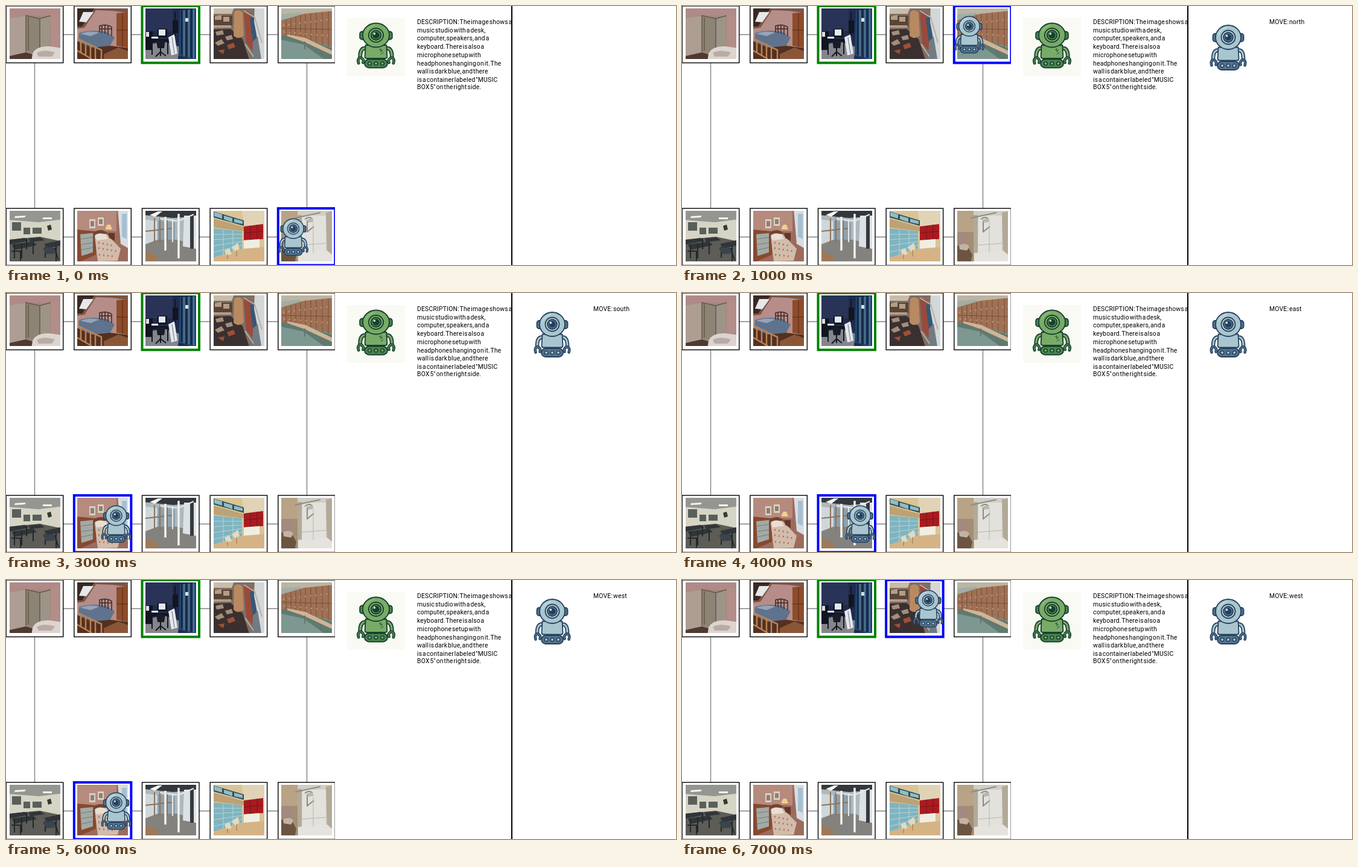
Write an HTML page that moves like this. It is 1110 by 430 pixels and loops after 8000 ms.

```html
<!DOCTYPE html>
<html lang="en">
<head>
<meta charset="utf-8">
<title>Robot room search</title>
<style>
  html, body { margin: 0; width: 100%; height: 100%; overflow: hidden; background: #fff; }
  svg { display: block; }
  text { font: 10.4px Roboto, Arial, sans-serif; letter-spacing: .2px; word-spacing: -2px; }
  .blue { --light: #a9c6d0; --mid: #55738f; --dark: #24405c; --pale: #c3d9e0; }
  .green { --light: #78ab68; --mid: #4b8550; --dark: #17402d; --pale: #8dbb78; }
  #rooms path[stroke] { fill: none; }
</style>
</head>
<body>
<svg width="1110" height="430" viewBox="0 0 1110 430">
  <defs>
    <clipPath id="photo"><path d="M0 0H84V84H0z"/></clipPath>
    <filter id="soft"><feGaussianBlur stdDeviation=".7"/></filter>
    <!-- origin: middle of the top edge of the head -->
    <g id="robot" stroke="var(--dark)" stroke-width="1.8" stroke-linejoin="round" stroke-linecap="round">
      <g id="arm" fill="none">
        <path d="M-18 43Q-25 44-25 57" stroke-width="6.5"/>
        <path d="M-18 43Q-25 44-25 57" stroke="var(--light)" stroke-width="3"/>
        <path d="M-27.500 68C-30 60-25 57-22 60Q-18.500 63-20.500 67" stroke-width="4.6"/>
        <path d="M-27.500 68C-30 60-25 57-22 60Q-18.500 63-20.500 67" stroke="var(--mid)" stroke-width="1.8"/>
      </g>
      <use href="#arm" transform="scale(-1 1)"/>
      <rect x="-25.500" y="15.500" width="51" height="13" rx="3.500" fill="var(--mid)"/>
      <path d="M-16.500 38H16.500L17.500 57Q17.500 60 14 60H-14Q-17.500 60-17.500 57z" fill="var(--light)"/>
      <ellipse cy="21.500" rx="21" ry="20" fill="var(--light)"/>
      <path d="M-16 17Q-12 7-3 5.500" fill="none" stroke="var(--pale)"/>
      <circle cy="21.500" r="11.500" fill="var(--pale)"/>
      <circle cy="21.500" r="8" fill="var(--mid)"/>
      <circle cy="21.500" r="4.500" fill="var(--dark)"/>
      <circle cx="-2.500" cy="19" r="1.700" fill="#e8f2f3" stroke="none"/>
      <rect x="-18" y="61.500" width="36" height="14" rx="7" fill="var(--mid)"/>
      <g fill="var(--light)" stroke-width="1.6">
        <circle cx="-10" cy="68.500" r="2.800"/><circle cy="68.500" r="2.800"/><circle cx="10" cy="68.500" r="2.800"/>
      </g>
    </g>
    <g id="rooms">
      <g id="shower">
        <path fill="#a08680" d="M-4-4H88V88H-4z"/>
        <path fill="#b08a86" d="M-4-4H88V14L27 11L-4 17z"/>
        <path fill="#ae9d92" d="M-4 17L27 12V73L-4 80z"/>
        <path fill="#8d8476" d="M27 12L50 17V77L27 71z"/>
        <path fill="#9d9488" d="M50 17L67 12V68L50 77z"/>
        <path stroke="#665944" stroke-width="1.5" d="M27 72V12L50 17L68 12M50 17V77M31 15V70"/>
        <path fill="#b38d87" d="M68 10H88V64H68z"/>
        <path fill="#4f3a30" d="M-4 80L27 73L44 78L39 88H-4z"/>
        <path fill="#ddd4cf" d="M38 75Q44 62 66 63L88 66V88H36z"/>
        <path fill="#b9aca6" d="M45 74Q56 67 75 73L70 80H48z"/>
      </g>
      <g id="attic">
        <path fill="#b68d88" d="M-4-4H88V88H-4z"/>
        <path fill="#7b5546" d="M-4-4H88V8L58 4L31 3L12 32L-4 34z"/>
        <path fill="#3a2821" d="M-4-4H31L8 30H-4z"/>
        <path fill="#e6e8ea" d="M10 6H27L15 23L3 22z"/>
        <path fill="#8d4c2b" d="M65 8L88 6V66L65 62z"/>
        <path stroke="#592b18" d="M75 8V64M65 36H84"/>
        <path fill="#5f738e" d="M3 41Q22 34 48 39L62 48L54 63L22 65L2 53z"/>
        <path fill="#95a4b7" d="M5 42Q20 36 37 40L22 46z"/>
        <path stroke="#3b2927" stroke-width="1.5" d="M37 40V29Q48 25 57 31V46M41 29V41M46 28V42M51 29V44M37 34H57"/>
        <path fill="#55301f" d="M-4 52L24 65L55 62L88 66V88H-4z"/>
        <path stroke="#b98458" stroke-width="2.5" d="M0 50L40 69V84M0 70L24 84M6 53V74M14 57V78M22 61V82M30 65V84"/>
        <path fill="#8b5638" d="M44 76L68 65L88 72V88H44z"/>
      </g>
      <g id="studio">
        <path fill="#202a4c" d="M-4-4H88V88H-4z"/>
        <path fill="#293358" d="M-4-4H45V38H-4z"/>
        <path fill="#85868d" d="M-4 62L31 55L57 64L53 88H-4z"/>
        <path fill="#24466c" d="M57 3L88 0V88L55 78z"/>
        <path stroke="#567899" stroke-width="2" d="M64 3V79M72 2V81M80 1V83"/>
        <path stroke="#142239" stroke-width="2" d="M60 3V77M68 2V81M76 1V82"/>
        <path fill="#11151f" d="M-4 38H12V69H-4zM20 34H36V48H20zM45 20H54V41H45zM7 51H39V56H7z"/>
        <path fill="#e5e9ef" d="M22 35H33V45H22zM10 47H21V50H10zM38 48L48 43L53 75L43 78z"/>
        <path stroke="#687080" d="M44 48L48 75"/>
        <path fill="#191c27" d="M18 53H33L31 66H20z"/>
        <path stroke="#12161f" stroke-width="2" d="M11 53V77M37 53V76M25 65V79M17 80L25 72L34 79M49 6V45"/>
        <path fill="#dce0e4" d="M1 39H6V47H1zM66 16H71V22H66z"/>
      </g>
      <g id="closet">
        <path fill="#806e63" d="M-4-4H88V88H-4z"/>
        <path fill="#c9bca8" d="M-4-4H35L30 9H-4z"/>
        <path fill="#594438" d="M-4 12H31V29H-4z"/>
        <path fill="#b39d85" d="M2 13L13 11V19H2zM16 14H26V22H16zM-4 28H29V32H-4z"/>
        <path fill="#3a3030" d="M-4 35L28 34L48 51L60 88H-4z"/>
        <path fill="#a38e7a" d="M3 39L15 36L17 43L5 45zM19 47L30 44L32 51L22 53zM2 57L13 51L18 58L7 62z"/>
        <path fill="#9d5038" d="M22 61L33 57L36 64L25 68zM7 70L18 68L16 76z"/>
        <path fill="#b98a62" d="M34 6Q41 0 48 7L50 45Q40 53 33 45z"/>
        <path fill="#994a3b" d="M50 5L62 8L72 43L66 72L54 58z"/>
        <path fill="#375873" d="M60 16L69 13L75 58L67 72z"/>
        <path fill="#d4d7d8" d="M68-4H88V88H76L73 55L67 22z"/>
        <path fill="#717b84" d="M65 55L73 47L79 84H64z"/>
        <path stroke="#b4b1ab" stroke-width="2" d="M50 4L68 15L80 57M52 59L66 80"/>
      </g>
      <g id="lockers">
        <path fill="#7d9791" d="M-4-4H88V88H-4z"/>
        <path fill="#bcb5a2" d="M-4-4H88V10L-4 23z"/>
        <path fill="#a0aea6" d="M-4 10L32 7V15L-4 23z"/>
        <path fill="#a17154" d="M-4 21L37 9L88 4V65L38 50L-4 45z"/>
        <path stroke="#71503e" d="M8 18V46M16 16V47M24 14V48M32 11V49M40 9V51M49 8V54M58 7V57M68 6V60M78 5V64M0 33L84 35"/>
        <path stroke="#cba082" stroke-width="2" stroke-dasharray="2 7" d="M3 28L84 18M4 39L84 46"/>
        <path fill="#5f7a70" d="M-4 44L37 49L88 67V88H76L37 60L-4 51z"/>
        <path fill="#d0b496" d="M10 43L40 49L88 72V79L39 56L10 46z"/>
        <path stroke="#69726b" stroke-width="2" d="M39 55V68M66 69V81"/>
      </g>
      <g id="classroom">
        <path fill="#d6d4c4" d="M-4-4H88V88H-4z"/>
        <path fill="#949692" d="M-4-4H88V14L48 19L-4 15z"/>
        <path fill="#f7f7ee" d="M9 9L27 8L25 11L8 12zM55 11L70 11V14H55z"/>
        <path fill="#58605a" d="M4 19H19V33H4zM23 28H34V39H23zM38 28H53V38H38z"/>
        <path fill="#313b30" d="M62 25L68 23L70 31L64 33z"/>
        <path fill="#5d5c57" d="M-4 48L50 43L88 51V88H-4z"/>
        <path fill="#303538" d="M-4 49L25 45L31 50L0 56zM31 46L51 44L58 49L34 52zM4 56L39 51L45 57L8 65zM57 55L84 49V58L62 62z"/>
        <path stroke="#23282b" stroke-width="2" d="M8 56V79M20 54V79M39 54V72M59 60V78M77 58V84M3 67H18V83M56 63H75L81 82M28 46V64"/>
        <path fill="#39444d" d="M55 62L72 60L76 71L60 72z"/>
      </g>
      <g id="bedroom">
        <path fill="#9c6b5c" d="M-4-4H88V88H-4z"/>
        <path fill="#b58b7e" d="M-4-4H65V34H-4z"/>
        <path fill="#ddd0c0" d="M20 14H30V29H20zM34 11H44V25H34z"/>
        <path fill="#8b807a" d="M22 17H28V26H22zM36 14H42V22H36z"/>
        <path fill="#87492f" d="M-4 31L31 34V73L-4 88z"/>
        <path fill="#a3aaa6" d="M5 39L26 37V69L7 75z"/>
        <path stroke="#717d7b" d="M6 47L26 44M7 56L26 53M7 65L26 61"/>
        <path fill="#d8dde2" d="M67-4H88V64L72 55z"/>
        <path fill="#a5c0d3" d="M74 5H82V47L74 43z"/>
        <path fill="#74432f" d="M28 35Q41 28 50 37V47L28 50z"/>
        <path fill="#d2bcab" d="M29 43L48 38L72 63L67 83L34 84z"/>
        <path fill="#e8ded2" d="M29 41Q35 35 47 39L51 47L32 49z"/>
        <path stroke="#ae7466" stroke-width="3" stroke-dasharray="2 5" d="M35 53L60 58M35 62L65 67M36 73L64 76"/>
        <path fill="#f2ce8c" d="M47 28L50 23H55L58 31H47z"/>
        <path fill="#62372a" d="M51 37H62V50L53 45z"/>
      </g>
      <g id="basement">
        <path fill="#aeb8bd" d="M-4-4H88V88H-4z"/>
        <path fill="#34383c" d="M-4-4H88V9L46 12L-4 7z"/>
        <path fill="#f4f5ee" d="M7 7L21 1H28L16 10z"/>
        <path fill="#d0d7da" d="M-4 14L20 17V51L-4 57z"/>
        <path fill="#8fa0ac" d="M20 16L49 19V48L20 50z"/>
        <path fill="#84827e" d="M-4 57L20 48H53L88 58V88H-4z"/>
        <path fill="#9f7957" d="M-4 65L22 76L15 88H-4z"/>
        <path stroke="#8b745f" stroke-width="2" d="M15 12V53M24 11V53M36 13V53M0 34L46 29"/>
        <path fill="#dce2e4" d="M64 8H88V64L62 59z"/>
        <path fill="#363a3e" d="M74 7H80V63H74z"/>
        <path stroke="#f0f2ef" stroke-width="3.500" d="M33 10V66M55 5V79"/>
        <path stroke="#e6e9e9" stroke-width="2" d="M24 13L55 17L80 6M45 14V52"/>
      </g>
      <g id="kitchen">
        <path fill="#d9c497" d="M-4-4H88V88H-4z"/>
        <path fill="#e0d3b6" d="M46-4H88V25L51 31z"/>
        <path fill="#364c50" d="M-4 0L50 16V25L-4 10z"/>
        <path fill="#8cbecb" d="M1 2L14 6V13L1 9zM17 8L31 12V19L17 14zM34 13L48 17V22L34 19z"/>
        <path fill="#bca274" d="M-4 12L50 27V34L-4 27z"/>
        <path fill="#7fb4c0" d="M-4 29L47 34V63L-4 79z"/>
        <path stroke="#b5d4d8" d="M0 39L47 39M0 48L47 45M0 58L47 51M0 69L47 57M16 32V73M32 33V68"/>
        <path fill="#a81b20" d="M50 26L82 22V47L50 49z"/>
        <path stroke="#7d1318" d="M61 25V49M72 23V48M50 37L82 34"/>
        <path fill="#f0eee2" d="M50 49L76 47V62L50 64z"/>
        <path fill="#d6b384" d="M-4 79L49 63L88 60V88H-4z"/>
        <path fill="#e6d9bc" d="M30 61L40 53L43 63L36 68zM18 66L26 62L30 72L21 74z"/>
        <path stroke="#967649" d="M23 72V80M38 65V76"/>
      </g>
      <g id="bathroom">
        <path fill="#a28d75" d="M-4-4H88V88H-4z"/>
        <path fill="#b8a386" d="M-4-4H28V35H-4z"/>
        <path fill="#d0cec6" d="M27-4H88V88H27z"/>
        <path fill="#e2e1dc" d="M35 8H74V70L34 75z"/>
        <path fill="#b3a998" d="M27 7H34V88H27zM74 3L88 0V88L76 77z"/>
        <path stroke="#8f8b7d" stroke-width="2" d="M23 12L65 3M39 14Q47 8 52 14M43 15V36M43 35L54 26"/>
        <path fill="#b8b7b1" d="M42 15L51 12L54 18L44 20z"/>
        <path fill="#a5887f" d="M1 38Q11 32 17 41L15 57L2 56z"/>
        <path fill="#6b5541" d="M-4 58L16 57L25 73L22 88H-4z"/>
        <path fill="#e4e3dd" d="M28 70L76 66L88 76V88H28z"/>
        <path fill="#c3b3a5" d="M3 57Q16 52 20 60L16 66L4 64z"/>
        <path stroke="#b6b5ae" d="M34 57L74 54M53 20V70"/>
      </g>
    </g>
  </defs>

  <svg width="545" height="430">
    <path d="M47 47.500H498M47 383.500H498M47.500 47V383M498.500 47V383" fill="none" stroke="#808080" stroke-width="1.4"/>
    <g id="map"></g>
    <rect id="here" width="94.500" height="94.400" fill="none" stroke="#00f" stroke-width="4"/>
    <use id="walker" class="blue" href="#robot"/>
  </svg>

  <path d="M565 20H661V116H565z" fill="#fafaf5"/>
  <g class="green" transform="translate(613 27)">
    <use href="#robot" transform="scale(1.05 1)"/>
    <path d="M5 46l3-2v5l3-3M8 53l4-3" fill="none" stroke="var(--dark)"/>
  </g>
  <g id="description"></g>
  <path d="M837 0H839V430H837z"/>
  <g id="panel">
    <use class="blue" href="#robot" transform="translate(905 30.500)"/>
    <text id="move" x="973" y="30"></text>
  </g>
</svg>
<script>
const $ = id => document.getElementById(id);
const rooms = [
  ['shower', 'attic', 'studio', 'closet', 'lockers'],
  ['classroom', 'bedroom', 'basement', 'kitchen', 'bathroom'],
];
const goal = 'studio';
const cellX = col => 0.2 + 112.65 * col;
const cellY = row => 336 * row;

$('map').innerHTML = rooms.flatMap((names, row) => names.map((name, col) => {
  const x = cellX(col), y = cellY(row);
  const border = name === goal ? 'stroke="#008000" stroke-width="4"' : 'stroke="#000" stroke-width="1.4"';
  return `<rect x="${x}" y="${y}" width="94.5" height="94.4" fill="#fff" ${border}/>
    <g transform="translate(${Math.round(x + 5.4)} ${y + 4})" clip-path="url(#photo)">
      <use href="#${name}" filter="url(#soft)"/>
    </g>`;
})).join('');

const lines = ['DESCRIPTION: The image shows a', 'music studio with a desk,', 'computer, speakers, and a',
  'keyboard. There is also a', 'microphone setup with', 'headphones hanging on it. The',
  'wall is dark blue, and there', 'is a container labeled "MUSIC', 'BOX 5" on the right side.'];
$('description').innerHTML = lines.map((line, i) =>
  `<text x="681" y="${30 + 13.7 * i - (i > 7 ? 2 : 0)}">${line}</text>`).join('');

// column, row and the move that led there, one step per second
const steps = [
  [4, 1, ''], [4, 0, 'north'], [1, 1, 'west'], [1, 1, 'south'],
  [2, 1, 'east'], [2, 1, 'south'], [1, 1, 'west'], [3, 0, 'west'],
];

function show([col, row, move]) {
  const x = cellX(col), y = cellY(row);
  $('here').setAttribute('x', x);
  $('here').setAttribute('y', y);
  const side = col === 4 ? -22 : 22.5;
  $('walker').setAttribute('transform', `translate(${x + 47.2 + side} ${y + 16}) scale(.82)`);
  $('panel').style.display = move ? '' : 'none';
  $('move').textContent = 'MOVE: ' + move;
}

const start = performance.now();
function frame() {
  show(steps[Math.floor((performance.now() - start) / 1000) % steps.length]);
  requestAnimationFrame(frame);
}
frame();
</script>
</body>
</html>
```
